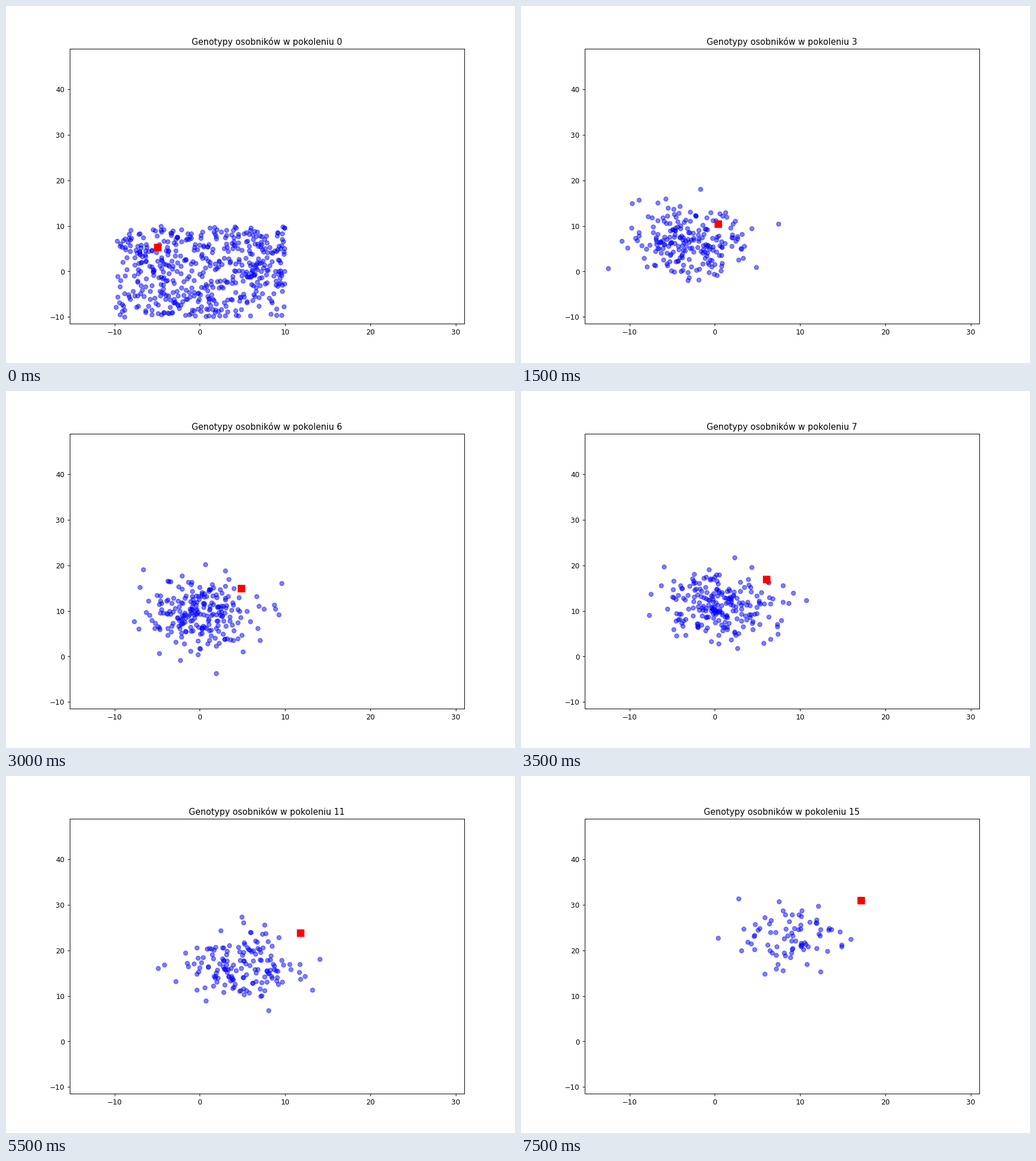
Write a matplotlib script that moves like this. It is 894x626 px and loops after 8000 ms.

```python
import numpy as np
import matplotlib.pyplot as plt
from matplotlib.animation import FuncAnimation

W, H, DPI = 894, 626, 89.4
GENERATIONS, STEP_MS = 16, 500

# Waypoints of the leader: generation, x, y
TRAIL = np.array([(0, -4.96, 5.26), (1, -2.96, 6.95), (4, 2.02, 12.2),
                  (6, 4.82, 15.0), (9, 8.59, 20.9), (11, 11.8, 23.9),
                  (15, 17.1, 31.05)])


def population(gen):
    """Uniform start, then a drifting normal cloud that grows and thins out."""
    rng = np.random.default_rng(100 + gen)
    if gen == 0:
        return rng.uniform(-10, 10, (500, 2))
    size = int(232 * np.exp(-(gen - 5)**2 / 92) * (1 - np.exp(-gen)))
    center = (-5.2 + 0.75 * gen + 0.013 * gen**2,
              3.0 + 1.0 * gen + 0.022 * gen**2)
    return rng.normal(center, (3.3, 3.9), (size, 2))


def leader_at(gen):
    g, x, y = TRAIL.T
    return np.interp(gen, g, x), np.interp(gen, g, y)


# The small margin keeps float rounding from losing a pixel
fig, ax = plt.subplots(figsize=((W + 0.01) / DPI, (H + 0.01) / DPI), dpi=DPI)
ax.set(xlim=(-15.26, 30.99), ylim=(-11.48, 48.9))
dots = ax.scatter([], [], s=36, c="blue", alpha=0.5)
leader = ax.scatter([], [], s=100, c="red", marker="s", zorder=3)
title = ax.set_title("")


def update(gen):
    dots.set_offsets(population(gen))
    leader.set_offsets([leader_at(gen)])
    title.set_text(f"Genotypy osobników w pokoleniu {gen}")
    return dots, leader, title


anim = FuncAnimation(fig, update, frames=GENERATIONS, interval=STEP_MS,
                     repeat=True, repeat_delay=0, blit=False)
plt.show()
```
